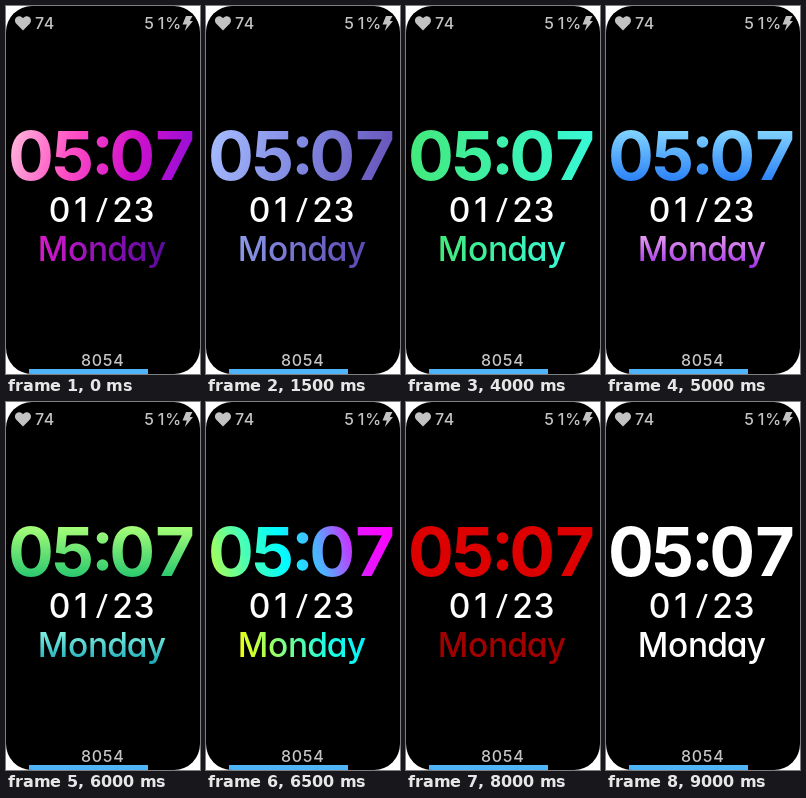
An HTML page for the animation above (9500 ms loop, 194x368 px).

```html
<!DOCTYPE html>
<html lang="en">
<head>
<meta charset="utf-8">
<title>Watch face</title>
<style>
  html, body { margin: 0; width: 100%; height: 100%; overflow: hidden; background: #fff; }
  svg { display: block; width: 194px; height: 368px; }
  text { font-family: Inter, Lato, sans-serif; font-feature-settings: "cv11"; text-anchor: middle; }
  .clock { font-size: 68px; font-weight: 700; }
  .line { font-size: 33.5px; font-weight: 500; }
  .small { font-size: 16px; font-weight: 500; }
  .slash { font-family: "Open Sans", sans-serif; }
</style>
</head>
<body>
<svg viewBox="0 0 194 368">
  <defs>
    <clipPath id="face"><rect width="194" height="368" rx="26"/></clipPath>
    <linearGradient id="clockFill" gradientUnits="userSpaceOnUse"></linearGradient>
    <linearGradient id="dayFill" gradientUnits="userSpaceOnUse"></linearGradient>
  </defs>
  <g clip-path="url(#face)">
    <rect width="194" height="368"/>
    <g fill="#c3c3c3">
      <path d="M17 24.5L10.3 17.7C6.3 13.4 12.2 7 17 12.3C21.8 7 27.7 13.4 23.7 17.7Z"/>
      <text class="small" x="33.5 43" y="23">74</text>
      <text class="small" x="143 155 167.2" y="23">51%</text>
      <path d="M180 10H186.5L183.8 15H187L178.8 25L180.8 18.5H176.5Z"/>
      <text class="small" x="80 91 101.5 112.5" y="359.7">8054</text>
    </g>
    <g fill="url(#clockFill)">
      <text class="clock" x="25 67 126.3 169" y="174.4">0507</text>
      <circle cx="96.5" cy="136" r="5.8"/>
      <circle cx="96.5" cy="163" r="5.8"/>
    </g>
    <text class="line" x="53.5 75 96 116.5 138" y="215.7" fill="#fff">01<tspan class="slash">/</tspan>23</text>
    <text class="line" x="47 72 92 111.5 131 150.3" y="255" fill="url(#dayFill)">Monday</text>
    <rect x="23" y="363" width="119" height="5" fill="#50b4f8"/>
  </g>
</svg>
<script>
  const STEP = 500;
  // clock colours, day colours, direction: d falling, u rising, h across, v down
  const themes = [
    ['#ffb8dc #ff4fc4 #cf10cc #8f0fd8', '#d81cca #9010b8 #560a98', 'd'],
    ['#ffd86b #ff9a3c #f4511e', '#ffb04a #e64a19', 'd'],
    ['#a8f0c0 #3ccf91 #0f9b8e', '#4fd8a0 #0b7f78', 'd'],
    ['#a6bcff #8088e0 #6650b8', '#8c9ae6 #5a46b0', 'd'],
    ['#ffe29f #ffa99f #ff719a', '#ffb8a0 #ff719a', 'd'],
    ['#84fab0 #8fd3f4', '#84fab0 #8fd3f4', 'h'],
    ['#ff5c7c #c56bb0 #9078e4', '#c968b8 #7584ff', 'd'],
    ['#f9d423 #ff4e50', '#f9b035 #ff4e50', 'd'],
    ['#43e97b #38f9d7', '#43e97b #38f9d7', 'h'],
    ['#fa8bff #2bd2ff #2bff88', '#fa8bff #2bd2ff', 'd'],
    ['#82d4ff #2a80f8', '#e49af0 #a02ee4', 'v'],
    ['#ffe066 #ff8a1f', '#ff9a9a #f03a4a', 'v'],
    ['#a8ff78 #28c76f', '#7ff0e0 #18a8b8', 'v'],
    ['#b4ff4b #50ffaf #00ffff #58a8ff #e418ff #ff00ff', '#f8ff08 #88ff78 #20ffe0 #00f0ff', 'u'],
    ['#2196f3', '#1769aa', 'h'],
    ['#00c853', '#008c3a', 'h'],
    ['#dc0000', '#a00000', 'h'],
    ['#ffc107', '#b28704', 'h'],
    ['#ffffff', '#ffffff', 'h']
  ];
  const boxes = { clockFill: [4, 124, 187, 176], dayFill: [33, 230, 159, 262] };

  function paint(id, colours, dir) {
    const fill = document.getElementById(id);
    const [left, top, right, bottom] = boxes[id];
    const ends = {
      x1: left,
      y1: dir === 'u' ? bottom : top,
      x2: dir === 'v' ? left : right,
      y2: dir === 'd' || dir === 'v' ? bottom : top
    };
    for (const key in ends) fill.setAttribute(key, ends[key]);
    const list = colours.split(' ');
    fill.innerHTML = list.map((c, i) =>
      `<stop offset="${i / Math.max(1, list.length - 1)}" stop-color="${c}"/>`).join('');
  }

  let shown = -1;
  function draw() {
    const now = Math.floor(performance.now() / STEP) % themes.length;
    if (now !== shown) {
      const [clock, day, dir] = themes[shown = now];
      paint('clockFill', clock, dir);
      paint('dayFill', day, dir);
    }
    requestAnimationFrame(draw);
  }
  draw();
</script>
</body>
</html>
```
